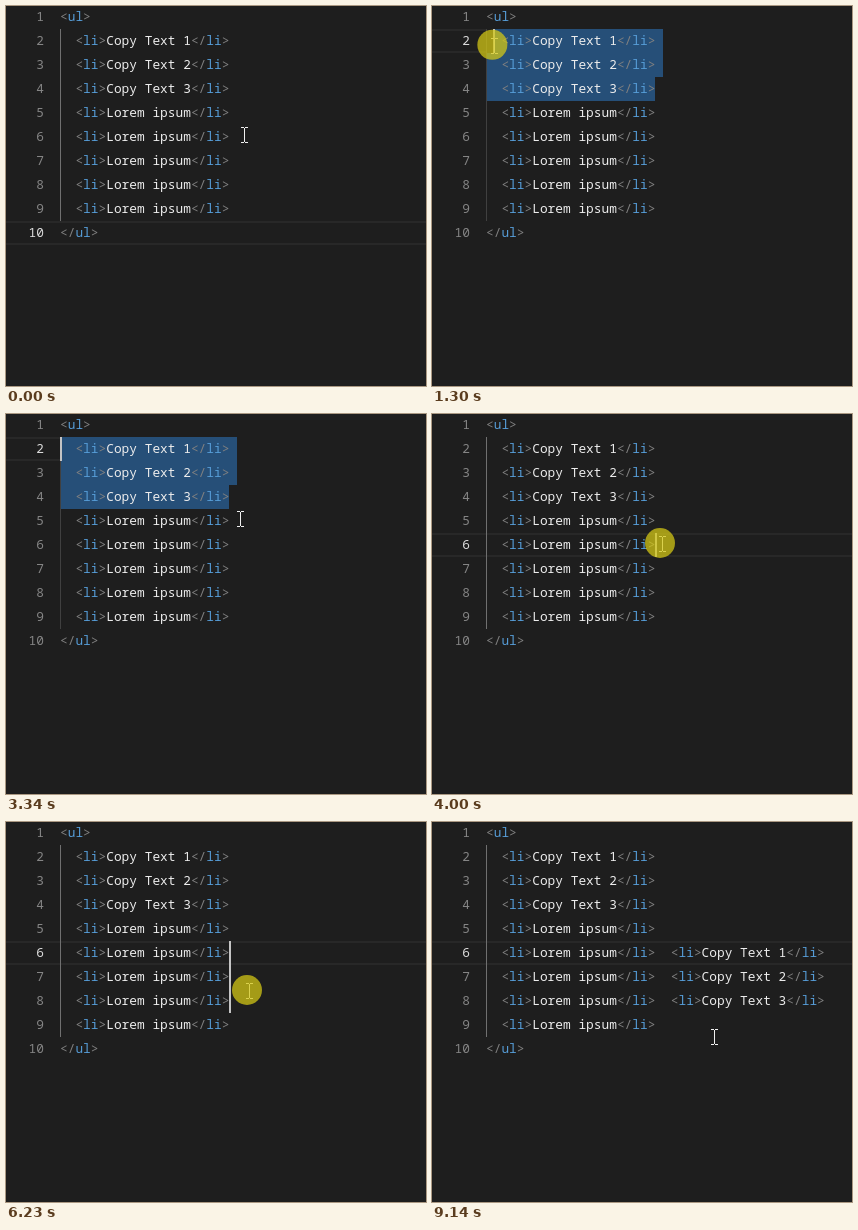
An HTML page with a canvas that plays this animation: 420 px wide and 380 px high, repeating every 9190 ms.

```html
<!DOCTYPE html>
<html lang="en">
<head>
<meta charset="utf-8">
<title>Column paste</title>
<style>
  html, body { margin: 0; width: 100%; height: 100%; overflow: hidden; background: #1e1e1e; }
  canvas { display: block; }
</style>
</head>
<body>
<canvas id="stage" width="420" height="380"></canvas>
<script>
const ctx = document.getElementById('stage').getContext('2d');
const LOOP = 9190, BLINK = 510, TAP = 160;
const ROW = 24, COL = 7.7, LEFT = 54, LINE_END = 22;

const PRESS = 450, RELEASE = 1400, COPY = 3340, PASTE = 7380;
const clicks = [3900, 4920, 6180];
const caretResets = [RELEASE, COPY, ...clicks, PASTE];

const home = { x: 238, y: 129 };
const moves = [
  { from: 50, to: 400, x: 226, y: 84 },
  { from: 520, to: 890, x: 148, y: 57 },
  { from: 890, to: RELEASE, x: 53, y: 38 },
  { from: 2110, to: 2980, x: 234, y: 105 },
  { from: 3590, to: 3780, x: 230, y: 130 },
  { from: 4310, to: 4540, x: 244, y: 158 },
  { from: 5570, to: 5900, x: 243, y: 169 },
  { from: 7690, to: 7840, x: 282, y: 215 }
];

const lines = ['<ul>'];
for (let i = 1; i <= 8; i++) {
  lines.push(`  <li>${i < 4 ? 'Copy Text ' + i : 'Lorem ipsum'}</li>`);
}
lines.push('</ul>');

const clamp = (v, min, max) => Math.max(min, Math.min(max, v));
const smooth = u => u * u * (3 - 2 * u);
const lineTop = n => (n - 1) * ROW - 1;
const colX = c => LEFT + c * COL;

function box(x, y, w, h, color) {
  ctx.fillStyle = color;
  ctx.fillRect(x, y, w, h);
}

function mouseAt(t) {
  let { x, y } = home;
  for (const move of moves) {
    const k = smooth(clamp((t - move.from) / (move.to - move.from), 0, 1));
    x += (move.x - x) * k;
    y += (move.y - y) * k;
  }
  return { x, y };
}

function isPressed(t) {
  return t >= PRESS && t < RELEASE || clicks.some(c => t >= c && t < c + TAP);
}

function isCaretOn(t) {
  if (t < RELEASE) return t >= PRESS;
  const last = caretResets.filter(r => r <= t).pop();
  return Math.floor((t - last) / BLINK) % 2 === 0;
}

function dragFocus(t) {
  const m = mouseAt(Math.min(t, RELEASE));
  return {
    line: clamp(Math.floor((m.y + 1) / ROW) + 1, 2, 4),
    col: clamp(Math.round((m.x - LEFT) / COL), 0, LINE_END)
  };
}

function drawCode(text, x, y) {
  for (const part of text.match(/<\/?|>|[^<>]+/g)) {
    const isTag = /^(ul|li)$/.test(part);
    ctx.fillStyle = /[<>]/.test(part) ? '#808080' : isTag ? '#569cd6' : '#ececec';
    ctx.fillText(part, x, y);
    x += part.length * COL;
  }
}

function drawActiveLine(n, width) {
  box(0, lineTop(n), width, 2, '#282828');
  box(0, lineTop(n) + ROW - 2, width, 2, '#282828');
}

function drawSelection(focus) {
  for (let n = focus.line; n <= 4; n++) {
    const from = Math.floor(colX(n === focus.line ? focus.col : 0));
    const to = Math.floor(colX(n === 4 ? LINE_END : LINE_END + 1));
    box(from, lineTop(n), to - from, ROW, '#264f78');
  }
}

function drawBeam(x, y) {
  x = Math.round(x);
  y = Math.round(y);
  box(x, y - 7, 1, 14, '#f0f0f0');
  for (const cap of [-8, 7]) {
    box(x - 3, y + cap, 3, 1, '#f0f0f0');
    box(x + 1, y + cap, 3, 1, '#f0f0f0');
  }
}

function drawArrow(x, y) {
  ctx.save();
  ctx.translate(Math.round(x) - 0.5, Math.round(y) - 0.5);
  ctx.fillStyle = '#fff';
  ctx.strokeStyle = '#000';
  ctx.lineWidth = 1;
  const arrow = new Path2D('M0 0V16L4 12.5 6.5 18.5 9 17.5 6.5 11.5H11.5Z');
  ctx.fill(arrow);
  ctx.stroke(arrow);
  ctx.restore();
}

function drawChevron() {
  ctx.strokeStyle = '#c5c5c5';
  ctx.lineWidth = 1.4;
  ctx.stroke(new Path2D('M43 8L48 13.5 53 8'));
}

function drawPressMark({ x, y }) {
  ctx.fillStyle = 'rgba(212,200,22,.74)';
  ctx.beginPath();
  ctx.arc(x - 2, y - 1, 15, 0, 2 * Math.PI);
  ctx.fill();
}

function draw(t) {
  const mouse = mouseAt(t);
  const clicked = clicks.filter(c => c <= t).length;
  const selecting = t >= PRESS && !clicked;
  const focus = selecting ? dragFocus(t) : null;
  const active = selecting ? focus.line : clicked ? 6 : 10;
  const hasSelection = selecting && (focus.line < 4 || focus.col < LINE_END);
  const inGutter = mouse.x < 56;
  const pasted = t >= PASTE;

  box(0, 0, 420, 380, '#1e1e1e');
  drawActiveLine(active, hasSelection ? LEFT : 420);
  if (hasSelection) drawSelection(focus);
  box(LEFT, 23, 1, 8 * ROW, hasSelection ? '#404040' : '#707070');

  ctx.font = `500 ${COL / 0.6}px "Noto Sans Mono", "DejaVu Sans Mono", monospace`;
  lines.forEach((line, i) => {
    const n = i + 1, y = i * ROW + 15;
    ctx.fillStyle = n === active ? '#dcdcdc' : '#858585';
    ctx.fillText(n, 38 - String(n).length * COL, y);
    drawCode(line.trim(), colX(line.startsWith(' ') ? 2 : 0), y);
    if (pasted && n >= 6 && n <= 8) drawCode(lines[n - 5].trim(), colX(24), y);
  });

  if (isCaretOn(t)) {
    const col = selecting ? focus.col : pasted ? 2 * LINE_END : LINE_END;
    const rows = Math.max(1, clicked);
    box(Math.floor(colX(col)), lineTop(active), 2, rows * ROW, '#c4c4c4');
  }
  if (inGutter) drawChevron();
  (inGutter ? drawArrow : drawBeam)(mouse.x, mouse.y);
  if (isPressed(t)) drawPressMark(mouse);
}

const start = performance.now();
function tick() {
  draw((performance.now() - start) % LOOP);
  requestAnimationFrame(tick);
}
tick();
</script>
</body>
</html>
```
